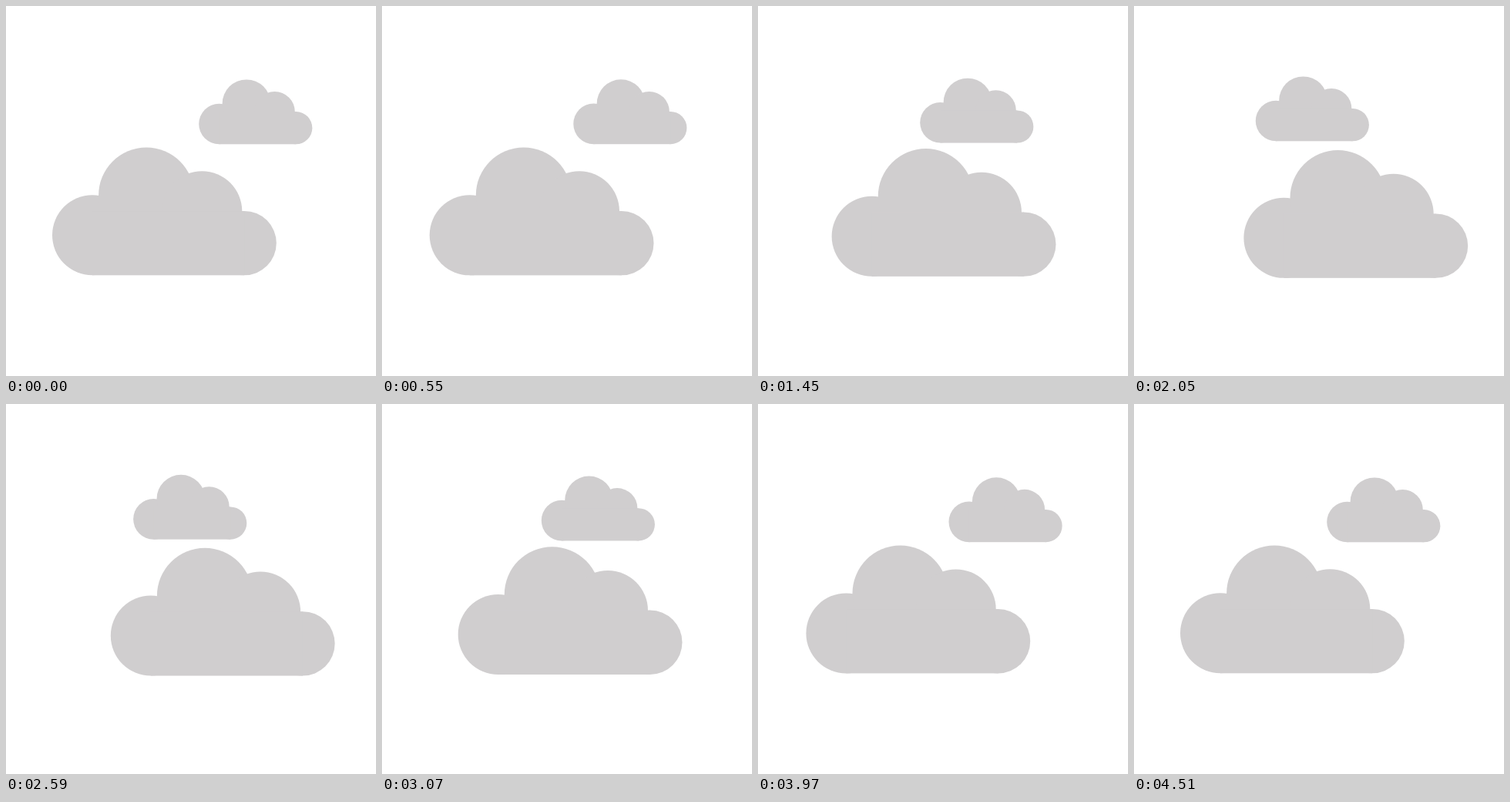
An HTML page that plays this animation: 480x480 px, repeating every 4640 ms.

```html
<!DOCTYPE html>
<html lang="en">
<head>
<meta charset="utf-8">
<title>Drifting clouds</title>
<style>
  html, body { margin: 0; width: 100%; height: 100%; overflow: hidden; background: #fff; }
  svg { display: block; width: 100%; height: 100%; fill: #d0cecf; }
</style>
</head>
<body>
<svg viewBox="0 0 480 480">
  <defs>
    <!-- origin: left end of the flat base -->
    <g id="cloud">
      <circle cx="52" cy="-52" r="52"/>
      <circle cx="122.1" cy="-103.8" r="62"/>
      <circle cx="194.3" cy="-83" r="52"/>
      <circle cx="249.1" cy="-41.7" r="41.7"/>
      <rect x="52" y="-83.2" width="197.1" height="83.2"/>
    </g>
  </defs>
  <use id="small" href="#cloud"/>
  <use id="large" href="#cloud"/>
</svg>
<script>
const LOOP = 4640, HOLD = 250, STEP = 60;
const PEAK = 35, RISE_START = 1.8, FALL_END = 68;
const ACCEL = 0.0967, KNEE = 29, TOP_SPEED = 5.3;
const LIFT = 0.043;

const small = document.getElementById("small");
const large = document.getElementById("large");

// Drift speeds up from rest, runs steadily to the turn, then mirrors back.
function drift(step) {
  const d = Math.max(0, step <= PEAK ? step - RISE_START : FALL_END - step);
  return d < KNEE ? ACCEL * d * d : ACCEL * KNEE * KNEE + TOP_SPEED * (d - KNEE);
}

function place(cloud, x, y, scale, dx) {
  cloud.setAttribute("transform",
    `translate(${x + dx} ${y + dx * LIFT}) scale(${scale})`);
}

function draw(time) {
  const t = time % LOOP;
  const step = t < HOLD ? 0 : Math.floor((t - HOLD) / STEP) + 1;
  const dx = drift(step);
  place(large, 60, 349.3, 1, dx);
  place(small, 250.2, 179.3, 0.506, -1.122 * dx);
}

const start = performance.now();
function tick() {
  draw(performance.now() - start);
  requestAnimationFrame(tick);
}
tick();
</script>
</body>
</html>
```
